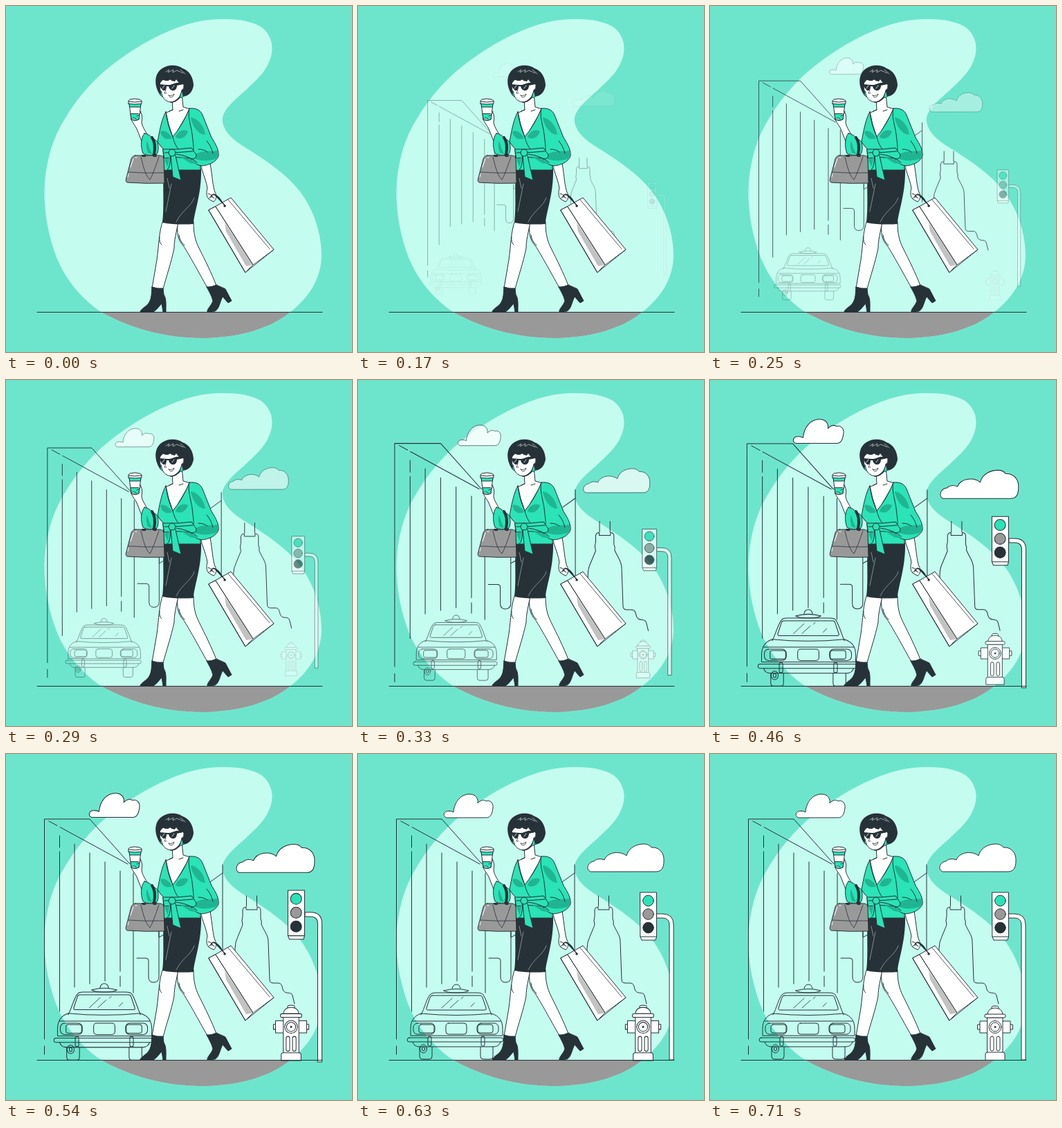
Recreate the animation shown at these times as an HTML page. Size 500x500 px, loop 0.75 s.

```html
<!DOCTYPE html>
<html lang="en">
<head>
<meta charset="utf-8">
<title>City stroll</title>
<style>
  html, body { margin: 0; width: 100%; height: 100%; overflow: hidden; background: #6de5cc; }
  svg { display: block; width: 100vw; height: 100vh; }
  .ink { fill: none; stroke: #263238; stroke-width: 1; stroke-linecap: round; stroke-linejoin: round; }
  .thin { stroke-width: .8; }
  .white { fill: #fff; }
  .teal { fill: #2ae3b6; }
  .shade { fill: #1fb592; stroke: none; }
  .gray { fill: #999; }
  .dark { fill: #263238; }
  .plain { stroke: none; }
  .pop { transform-box: fill-box; transform-origin: center; opacity: 0; }
</style>
</head>
<body>
<svg viewBox="0 0 500 500">
  <defs>
    <path id="blob" d="M312 19C340 18 360 24 370 31C382 41 386 54 384 68C380 92 362 107 345 123C328 138 311 152 313 167C315 183 330 195 350 207C378 225 404 242 424 267C446 296 456 330 456 362C455 392 440 420 410 443C383 465 340 479 285 480C230 480 180 466 137 442C105 420 82 390 70 355C58 320 54 285 56 255C59 220 68 190 85 163C106 128 130 102 160 80C192 56 228 37 260 27C280 21 296 19 312 19Z"/>
    <clipPath id="below"><path d="M0 442.5H500V500H0Z"/></clipPath>
  </defs>
  <use href="#blob" fill="#c5fcf0"/>
  <use href="#blob" fill="#999" clip-path="url(#below)"/>

  <!-- skyline -->
  <g class="pop ink" data-start="-25">
    <path d="M55.500 434V422M55.500 412V94H121L179 159M62 97L74 103.500M78 105.700L176 159"/>
    <path d="M77.500 118V135M77.500 141V372M99 130V337M121 143V332M143 156V328M165 169V314M165 321V336M184 172V345"/>
    <path d="M189 295H202Q206 295 206 299V322Q206 330 213 330Q221 330 221 322V256V265L228 261M313 160V285M313 172L295 185"/>
    <path d="M347.500 205V220M362.500 205V220M331 300V281Q331 272 335 264L342 247Q340 240 342 235V225Q343 221 347 221V225H363V221Q368 221 368 226V238Q370 242 369 246C373 256 379 262 379 271L381 326Q381 331 386 331H393C398 331 399 335 400 340C403 349 412 342 414 349L417 361"/>
  </g>

  <!-- clouds -->
  <g class="pop ink white" data-start="83">
    <path d="M128 92C122 91 123 82 131 82.500Q135 82 138 84C139 70 148 58 161 58C170 58 174 64 173 71C178 66 182 66 185 68C192 66 196 72 195 78C194 87 191 92 186 92Z"/>
    <path d="M336 170C329 168 331 156 341 155C345 151 351 151 356 153C360 142 378 139 388 147C391 135 403 130 413 130C418 130 422 132 424 135C436 134 443 144 442 155C442 165 438 170 431 170Z"/>
  </g>

  <!-- car -->
  <g class="pop ink" data-start="83">
    <path d="M124 342Q142 337 160 342Q156 345 142 345Q128 345 124 342ZM136 339Q137 333 142 333Q147 333 148 339"/>
    <path d="M91 377C96 368 99 354 104 348Q106 345 112 345H172Q179 345 181 348C186 356 189 368 193 377"/>
    <path d="M107 349H177Q179 349 180 352L185 367Q186 370 183 370H102Q98 370 99 367L104 352Q105 349 107 349Z"/>
    <path class="thin" d="M121 367L136 353M133 367L145 356M149 354L152 351M163 365L168 360"/>
    <path d="M91 375Q142 380 193 375C205 379 209 386 209 398V406M91 375C80 379 76 386 76 398V406M79 386H206M76 407H209M79 416Q81 423 88 423H196Q204 423 206 416"/>
    <rect x="80" y="389" width="31" height="16" rx="6"/>
    <rect x="88" y="391" width="22" height="12" rx="3"/>
    <rect x="172" y="389" width="31" height="16" rx="6"/>
    <rect x="173" y="391" width="22" height="12" rx="3"/>
    <rect x="127" y="389" width="30" height="16" rx="4"/>
    <rect x="71" y="410" width="139" height="6" rx="3"/>
    <rect x="101" y="408" width="5" height="14" rx="2"/>
    <rect x="178" y="408" width="5" height="14" rx="2"/>
    <path d="M89 423V437Q89 441 93 441H103Q107 441 107 437V423M177 423V437Q177 441 181 441H191Q195 441 195 437V423"/>
    <ellipse cx="94.500" cy="426" rx="5" ry="6"/><ellipse cx="94.500" cy="426" rx="2" ry="3"/>
  </g>

  <!-- traffic light -->
  <g class="pop ink white" data-start="83">
    <path d="M432 231H440Q456 231 456 247V442H450V247Q450 237 440 237H432Z"/>
    <path d="M408 200H431.500V264L430 269H410L408 264ZM408 264H431"/>
    <circle class="teal" cx="419.500" cy="212" r="7.800"/>
    <circle class="gray" cx="419.500" cy="231.500" r="7.800"/>
    <circle class="dark" cx="419.500" cy="251" r="7.800"/>
  </g>

  <!-- hydrant -->
  <g class="pop ink white" data-start="167">
    <path d="M407 368V366Q407 364 412 364Q417 364 417 366V368M401 376Q402 367 412 367Q422 367 423 376Z"/>
    <path d="M387 391H390V386H402V403H390V398H387ZM437 391H434V386H422V403H434V398H437ZM390 391V398M434 391V398"/>
    <path d="M401 381H423V432H401Z"/>
    <rect x="397" y="376" width="30" height="5" rx="2"/>
    <circle cx="412" cy="394.500" r="9"/><circle cx="412" cy="394.500" r="6.500"/><circle class="dark" cx="412" cy="394.500" r="1"/>
    <rect x="405" y="408" width="5" height="21" rx="2.500"/><rect x="414" y="408" width="5" height="21" rx="2.500"/>
    <path d="M398 442V434Q398 431 401 431H423Q426 431 426 434V442Z"/>
  </g>

  <path class="ink" d="M45 442.500H457"/>

  <!-- legs and boots -->
  <g class="ink white">
    <path d="M248 312C247 328 248 338 256 346C264 358 278 384 291 407L304 404C297 386 287 366 279 350C273 338 271 328 271 312Z"/>
    <path d="M227 310C221 325 221 345 218 367L211 408L227 409C231 393 239 370 243 350C243 338 246 328 249 312Z"/>
    <path d="M222 334Q221 342 225 345M250 331Q251 340 258 346"/>
    <path class="dark" d="M211 406Q219 409 227 408L228 417C232 423 231 431 231 442H227L225 430C221 434 218 439 213 442H194C194 438 204 434 207 428C211 421 210 414 211 406Z"/>
    <path class="dark" d="M290 406Q297 407 304 403C310 406 314 407 317 409L326 426L321 429L313 420C309 428 308 438 302 441L291 442C290 438 297 433 299 426C297 418 293 412 290 406Z"/>
  </g>

  <!-- right arm and shopping bag -->
  <g class="ink white">
    <path d="M281 228C284 242 290 253 291 264C289 270 290 276 293 279L300 283C304 280 305 274 302 269C299 262 298 245 295 227Z"/>
    <path d="M293 295L325 277L387 352L346 385Z"/>
    <path d="M303 290L357 374L346 385L293 295Z"/>
    <path class="plain" fill="#c2c2c2" d="M316 313L357 374L347 376L318 326Z"/>
    <path d="M321 280L381 351M303 290L357 374L387 352" class="thin" fill="none"/>
    <path d="M296 276Q298 270 303 274L317 289M300 272Q307 274 312 283" fill="none" style="stroke-width:1.500"/>
    <circle class="dark" cx="316" cy="289" r="1.200"/>
    <path d="M292 271Q296 271 299 276M293 278Q296 273 301 278" fill="none"/>
  </g>

  <!-- skirt -->
  <path class="dark" d="M228 235C226 262 229 288 226 313C240 316 258 316 271 315C271 300 283 272 282 235Z"/>
  <path class="ink thin" style="stroke:#9aa3a6" d="M239 257L231 297M233 249L236 263M272 277C268 290 255 294 246 312"/>

  <!-- left arm and cup -->
  <g class="ink white">
    <path d="M181 164C184 171 188 174 190 180L197 198L207 192C203 182 197 176 196 168C197 162 197 158 195 154L190 158Z"/>
    <path d="M178 141L181 164Q187 167 192 164L195 141Z"/>
    <path class="teal" d="M178 141L178.700 146H194.300L195 141ZM180 156L181 164Q187 167 192 164L193 156Z"/>
    <path d="M177 141V137L179 135Q186 133 193 135L196 137V141Q186 143 177 141ZM177 138Q186 140 196 138"/>
    <path d="M181 164Q183 160 188 163M189 159Q194 157 195 152"/>
  </g>

  <!-- neck and chest -->
  <path class="ink white" d="M240 134L241 150L230 155L241 192L266 149L256 146L254 126Z"/>
  <path class="ink" d="M236 152L241 150M250 152L256 150"/>

  <!-- blouse -->
  <g class="ink teal">
    <path d="M200 184C195 190 194 202 198 213Q207 218 217 215Q222 210 219 196C213 192 207 185 200 184Z"/>
    <path class="shade" d="M204 195Q201 202 205 212L211 214Q206 204 204 195ZM213 198Q211 205 216 210Q218 204 213 198Z"/>
    <path d="M231 153C225 163 222 180 219 196Q223 203 227 206L228 237H281Q282 225 276 210L265 148Q256 171 241 189Q234 172 231 153Z"/>
    <path class="shade" d="M223 182C227 178 236 183 240 191C233 194 226 192 223 182ZM245 190C247 181 257 177 263 181C261 189 253 194 245 190Z"/>
    <path d="M241 189Q243 199 249 207M231 153Q233 172 241 189" fill="none"/>
    <path d="M265 148C276 147 282 151 285 160L297 190C304 201 308 209 307 217C303 226 293 230 283 231C275 230 268 225 267 219C274 211 270 198 269 185C267 172 262 158 265 148Z"/>
    <path class="shade" d="M267 161C276 162 286 172 288 186C278 186 269 174 267 161ZM268 219C279 207 294 211 306 209Q308 216 303 221C290 225 279 224 268 219Z"/>
    <path d="M290 195Q297 203 299 213M278 207Q286 207 291 211" fill="none"/>
    <path d="M227 207Q248 208 268 205L275 215Q276 219 271 221Q250 217 229 220Z"/>
    <path d="M229 212Q250 212 270 210M246 214Q266 217 276 226" fill="none"/>
    <path d="M237 215C238 226 237 237 230 238M238 216L241 247L253 252Q249 235 245 216Z"/>
    <path class="shade" d="M252 218Q270 221 278 229L266 227ZM229 222L236 219L234 233Z"/>
    <ellipse cx="240" cy="212" rx="5" ry="5"/>
  </g>

  <!-- handbag -->
  <g class="ink">
    <path class="gray" d="M187 216H222Q227 216 228 221L229 256Q202 257 175 255Q172 253 174 248L181 221Q183 216 187 216Z"/>
    <path class="thin" d="M177 240Q202 242 228 241M195 218Q201 246 208 251Q213 242 221 218"/>
    <path style="stroke-width:4" d="M214 215Q217 198 211 190"/>
    <path style="stroke:#fff" d="M184 221L180 233M189 219H187M177 243L176 247"/>
    <path class="dark plain" d="M196 215H202V218H197ZM211 214H218L217 218H213Z"/>
  </g>

  <!-- head -->
  <path class="dark" d="M223 129C215 118 212 99 226 90C234 85 246 84 255 90C265 93 271 104 271 115C269 125 264 131 253 131Z"/>
  <path class="ink white" d="M223 107C221 116 223 127 227 132C231 138 237 140 243 138C249 134 253 129 254 122Q258 119 257 114Q254 109 252 113L248 106Z"/>
  <path class="dark" d="M219 113Q220 102 229 96H247L255 108L253 114Q248 110 246 106L244 109L239 108L237 103L235 108L229 108L230 105Q225 107 222 113Z"/>
  <path class="ink thin" style="stroke:#b9c2c2" d="M231 95L236 92L234 96L242 92L241 96L247 93L256 97M252 92L259 98"/>
  <path class="dark" d="M221 113L233 114L237 114L246 111L256 111V113L247 115C247 120 244 123 240 122Q236 121 235 116H232C232 121 230 123 227 122C224 120 223 117 221 113Z"/>
  <path class="ink thin" style="stroke:#fff" d="M226 119L229 115M240 119L243 115"/>
  <path class="ink thin" d="M231 121L229 126H232M235 129Q239 131 243 127Q242 132 238 132Q236 131 235 129"/>
  <path class="ink" style="stroke-width:1.600" d="M238 139Q246 139 252 131"/>
  <path class="ink teal thin" d="M254 122L251 133L256 131ZM224 123L223 129L226 131Z"/>
</svg>
<script>
  const FPS = 24, FRAMES = 18, LOOP = 750, SPAN = 500;
  const parts = [...document.querySelectorAll('.pop')];

  const curve = (u, a, b) => 3 * (1 - u) ** 2 * u * a + 3 * (1 - u) * u * u * b + u ** 3;

  // cubic-bezier(.36, -.01, .5, 1.38)
  function ease(x) {
    if (x <= 0) return 0;
    if (x >= 1) return 1;
    let lo = 0, hi = 1;
    for (let i = 0; i < 24; i++) {
      const mid = (lo + hi) / 2;
      if (curve(mid, .36, .5) < x) lo = mid; else hi = mid;
    }
    return curve(lo, -.01, 1.38);
  }

  function draw() {
    const t = performance.now() % LOOP;
    const frame = Math.min(FRAMES - 1, Math.floor((t + 5.5) * FPS / 1000));
    const time = frame * 1000 / FPS;
    for (const el of parts) {
      const k = ease((time - el.dataset.start) / SPAN);
      el.style.opacity = frame ? Math.max(0, Math.min(1, k)) : 0;
      el.style.transform = `scale(${.5 + .5 * k})`;
    }
    requestAnimationFrame(draw);
  }
  draw();
</script>
</body>
</html>
```
